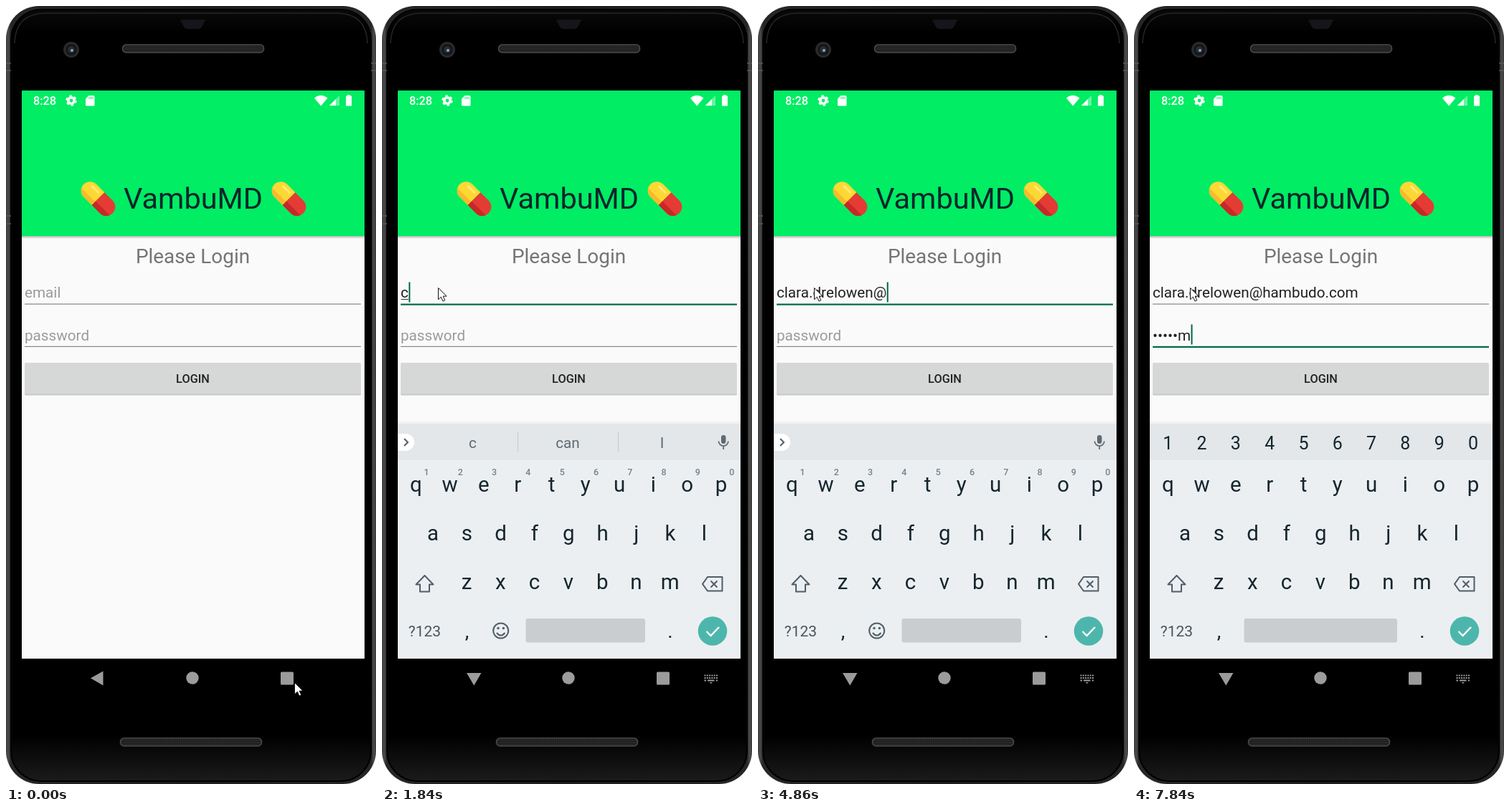
Animation of 516x1086 px, one loop 8 s. Source, as an HTML page:

```html
<!DOCTYPE html>
<html lang="en">
<head>
<meta charset="utf-8">
<title>Login</title>
<style>
  html, body { margin: 0; width: 100%; height: 100%; overflow: hidden; background: #fff; }
  svg { display: block; width: 100vw; height: 100vh; }
  text { font-family: Roboto, "Noto Sans", sans-serif; white-space: pre; }
  .mid { text-anchor: middle; }
  .field { font-size: 20.7px; }
  .line { fill: none; stroke: #4f5f68; stroke-width: 2; }
</style>
</head>
<body>
<svg viewBox="0 0 516 1086" preserveAspectRatio="none" xmlns="http://www.w3.org/2000/svg">
  <defs>
    <linearGradient id="rim" x1="0" x2="1" y1="0" y2="0">
      <stop offset="0" stop-color="#3a3a3a"/>
      <stop offset=".006" stop-color="#4c4c4c"/>
      <stop offset=".013" stop-color="#262626"/>
      <stop offset=".5" stop-color="#1c1c1c"/>
      <stop offset=".987" stop-color="#262626"/>
      <stop offset=".994" stop-color="#4c4c4c"/>
      <stop offset="1" stop-color="#3a3a3a"/>
    </linearGradient>
    <linearGradient id="glass" x1="0" x2="0" y1="0" y2="1">
      <stop offset="0" stop-color="#0a0a0a"/>
      <stop offset=".03" stop-color="#000"/>
      <stop offset=".94" stop-color="#000"/>
      <stop offset="1" stop-color="#1b1b1b"/>
    </linearGradient>
    <linearGradient id="shade" x1="0" x2="0" y1="0" y2="1">
      <stop offset="0" stop-color="#000" stop-opacity=".28"/>
      <stop offset="1" stop-color="#000" stop-opacity="0"/>
    </linearGradient>
    <pattern id="mesh" width="3" height="3" patternUnits="userSpaceOnUse">
      <rect width="3" height="3" fill="#2c2c2c"/>
      <circle cx="1.5" cy="1.5" r=".9" fill="#111"/>
    </pattern>
    <clipPath id="panel"><rect x="22" y="118" width="478" height="809"/></clipPath>
    <g id="pill" transform="rotate(45)">
      <path d="M0-12.5H-16a12.5 12.5 0 0 0 0 25H0z" fill="#fdd835"/>
      <path d="M0-12.5H16a12.5 12.5 0 0 1 0 25H0z" fill="#e53b35"/>
      <path d="M0 5H27.5a12.5 12.5 0 0 1-11.5 7.5H0z" fill="#c62828"/>
      <path d="M0 6H-26.5a12.5 12.5 0 0 0 10.5 6.500H0z" fill="#f9b92c"/>
      <path d="M-18-6.500H-6" stroke="#ffe971" stroke-width="3" stroke-linecap="round"/>
    </g>
    <rect id="slot" width="197" height="11" rx="5" fill="url(#mesh)" stroke="#4b4b4b" stroke-width="1.5"/>
  </defs>

  <!-- phone body -->
  <rect width="516" height="1086" rx="46" fill="url(#rim)"/>
  <rect x="7" y="5" width="502" height="1077" rx="42" fill="url(#glass)" stroke="#000" stroke-width="2"/>
  <path d="M12 52Q13 11 54 10H462Q503 11 504 52" fill="none" stroke="#262626" stroke-width="1.5"/>
  <path d="M0 80H7M0 90H7M0 293H7M0 304H7M509 80H516M509 90H516" stroke="#5a5a5a" stroke-width="1.5"/>
  <path d="M243 19H278L273 29Q271 32 267 32H254Q250 32 248 29Z" fill="#15151b"/>
  <use href="#slot" x="162.5" y="54"/>
  <use href="#slot" x="159.500" y="1022"/>
  <circle cx="91" cy="61" r="11" fill="#2b2b2b"/>
  <circle cx="91" cy="61" r="8" fill="#15171b"/>
  <circle cx="91" cy="61" r="4.500" fill="#27313b"/>
  <circle cx="92" cy="62" r="1.800" fill="#a9bccb"/>

  <!-- app -->
  <rect x="22" y="118" width="478" height="793" fill="#fafafa"/>
  <rect x="22" y="321" width="478" height="4" fill="url(#shade)"/>
  <rect x="22" y="118" width="478" height="203" fill="#00ed64"/>
  <g fill="#fff">
    <text x="38" y="138" font-size="16.300" font-weight="500">8:28</text>
    <circle cx="91" cy="132" r="4.200" fill="none" stroke="#fff" stroke-width="3.600"/>
    <circle cx="91" cy="132" r="6.500" fill="none" stroke="#fff" stroke-width="2.400" stroke-dasharray="3.400 3.407"/>
    <path d="M115.500 125H122q1.500 0 1.500 1.500V138q0 1.500-1.500 1.500H112.500q-1.500 0-1.500-1.500V129.500z"/>
    <path d="M116 127v3M118.500 127v3M121 127v3" stroke="#00ed64"/>
    <path d="M430 128.500Q439 121 448.500 128.500L439.200 139.500z"/>
    <path d="M465 125V139H451z" opacity=".4"/>
    <path d="M460 130V139H451z"/>
    <path d="M476 125.500V124H480V125.500H482V139.500H474V125.500z"/>
  </g>
  <use href="#pill" x="128.500" y="269"/>
  <use href="#pill" x="394.500" y="269"/>
  <text class="mid" x="261" y="283" font-size="41.500" fill="#08262c">VambuMD</text>
  <text class="mid" x="260.500" y="359" font-size="27.900" fill="#757575">Please Login</text>
  <text id="mail" class="field" x="26" y="407"/>
  <path id="compose" stroke="#333"/>
  <rect id="mailLine" x="26" y="415.500" width="469"/>
  <text id="pass" class="field" x="26" y="466.500"/>
  <rect id="passLine" x="26" y="474.800" width="469"/>
  <rect id="caret" width="2" height="28" fill="#00684a"/>
  <rect x="26" y="500" width="469" height="43.500" rx="2" fill="#000" opacity=".2"/>
  <rect x="26" y="498" width="469" height="43.500" rx="2" fill="#d6d7d7"/>
  <text class="mid" x="260.500" y="525.800" font-size="16.300" font-weight="500" fill="#212121">LOGIN</text>

  <!-- navigation bar -->
  <g fill="#9b9b9b">
    <path id="back"/>
    <circle cx="260" cy="938" r="8.700"/>
    <rect x="383" y="929.500" width="18" height="18" rx="1.500"/>
    <g id="kbIcon">
      <path d="M449.500 934.500H468M449.500 938H468" stroke="#9b9b9b" stroke-width="2" stroke-dasharray="2 1.300"/>
      <path d="M449.500 941.500H452M454 941.500H463.500M466 941.500H468" stroke="#9b9b9b" stroke-width="2"/>
      <path d="M456.500 944H461L458.700 946z"/>
    </g>
  </g>

  <!-- keyboard -->
  <g clip-path="url(#panel)"><g id="board">
    <rect x="22" y="580" width="478" height="3" fill="#000" opacity=".03"/>
    <rect x="22" y="583" width="478" height="328" fill="#eceff1"/>
    <rect x="22" y="583" width="478" height="51" fill="#e3e7ea"/>
    <g id="strip">
      <path d="M22 597H33a12 12 0 0 1 0 24H22z" fill="#fff"/>
      <path class="line" d="M31 604L36 609L31 614"/>
      <g id="words" fill="#5f6b72">
        <path d="M189.500 595V622M329.500 595V622" stroke="#c3c9cd"/>
      </g>
      <g fill="#5f6b72">
        <rect x="473" y="599" width="6.500" height="12" rx="3.200"/>
        <path d="M469.500 607.500a6.700 6.700 0 0 0 13.400 0M476.200 614V619" fill="none" stroke="#5f6b72" stroke-width="1.800"/>
      </g>
    </g>
    <g id="keys" fill="#14262e"></g>
    <path class="line" d="M59.500 795L71.500 807.500H66V817.500H53V807.500H47.500z" stroke-linejoin="round"/>
    <path class="line" d="M454 797H474.500V816.500H454L447 806.800z M458.500 802.500L467.500 811.500M467.500 802.500L458.500 811.500" stroke-linejoin="round"/>
    <text class="mid" x="59.500" y="879.500" font-size="21" fill="#45555e">?123</text>
    <g id="smile">
      <circle class="line" cx="165.700" cy="872" r="10.500"/>
      <path class="line" d="M160 875Q165.700 882 171.400 875"/>
      <circle cx="162" cy="868.500" r="1.700" fill="#4f5f68"/>
      <circle cx="169.400" cy="868.500" r="1.700" fill="#4f5f68"/>
    </g>
    <rect id="space" y="855" height="33.500" rx="3" fill="#c9cdd0"/>
    <circle cx="461" cy="872.500" r="20.300" fill="#4db6ac"/>
    <path d="M452.500 873L458.500 879L470 867" fill="none" stroke="#fff" stroke-width="2.400"/>
  </g></g>

  <path id="mouse" d="M0 0V16.200L3.900 12.700L6.500 18.500L9.300 17.300L6.700 11.600H11.600z" fill="#fff" stroke="#111"/>
</svg>
<script>
const LOOP = 8000;
const MAIL = "clara.drelowen@hambudo.com";
const PASS = "tolnem";
// moment of each key press
const mailTimes = [1840, 1960, 2090, 2220, 2350, 2480, 2610, 2740, 2910,
  3770, 3910, 4040, 4180, 4310, 4860, 5010, 5130, 5240, 5360, 5470, 5590, 5700, 5820,
  5970, 6050, 6130];
const passTimes = [6660, 6860, 7060, 7370, 7610, 7840];
const hints = ["thanks I we", "c can I", "cl close class", "cla class claim",
  "clar clarify clarity", "clara clarity clarinet"];
const CLICK = 1090, OPEN = 1170, NEXT = 6430;

const $ = id => document.getElementById(id);
const set = (el, attrs) => { for (const k in attrs) el.setAttribute(k, attrs[k]); };
const show = (el, on) => set(el, { display: on ? "inline" : "none" });
const count = (times, t) => times.filter(x => x <= t).length;

function label(parent, str, x, y, size, extra) {
  const el = document.createElementNS("http://www.w3.org/2000/svg", "text");
  el.textContent = str;
  set(el, { x, y, "font-size": size, class: "mid", ...extra });
  parent.appendChild(el);
  return el;
}

function row(str, x, y, size, extra) {
  return [...str].map((c, i) => label($("keys"), c, x + i * 47.3, y, size, extra));
}

row("qwertyuiop", 47.3, 677.5, 29.5);
row("asdfghjkl", 71, 745.7, 29.5);
row("zxcvbnm", 118, 814, 29.5);
label($("keys"), ",", 118.5, 881.5, 28);
label($("keys"), ".", 402, 881.5, 28);
const small = row("1234567890", 62, 655, 12.5, { fill: "#76828a", "font-weight": 500 });
const digits = row("1234567890", 47.3, 619, 25);
const words = [126.5, 259, 390.5].map(x => label($("words"), "", x, 616.5, 20.7));

function input(id, text, hint) {
  $(id).textContent = text || hint;
  set($(id), { fill: text ? "#212121" : "#9b9b9b" });
  return text ? $(id).getComputedTextLength() : 0;
}

function underline(id, on) {
  set($(id), { height: on ? 2.2 : 1.1, fill: on ? "#00684a" : "#7d7d7d" });
}

function moveMouse(t) {
  const step = t < 70 ? 0 : Math.min(8, Math.floor((t - 70) / 127.5) + 1);
  const p = step / 8, e = p * p * (3 - 2 * p);
  const over = step === 7 ? -32 : step === 6 ? -20 : 0;
  set($("mouse"), { transform: `translate(${402.5 - 324 * e} ${944.5 - 551 * e + over})` });
}

function draw(t) {
  const n = count(mailTimes, t), m = count(passTimes, t);
  const open = t >= OPEN, second = t >= NEXT;

  const mailWidth = input("mail", MAIL.slice(0, n), "email");
  const shown = m ? "•".repeat(m - 1) + PASS[m - 1] : "";
  const passWidth = input("pass", shown, "password");
  underline("mailLine", t >= CLICK && !second);
  underline("passLine", second);
  set($("compose"), { d: n && n < 6 ? `M26.5 409.5H${26 + mailWidth}` : "" });

  const caretX = 26.5 + (second ? passWidth : mailWidth);
  set($("caret"), { x: caretX, y: second ? 444.5 : 385.5 });
  show($("caret"), open && !(t >= 3360 && t < 3770));

  // keyboard rises the last few pixels while fading in
  const k = count([1170, 1230, 1300, 1380], t);
  show($("board"), open);
  set($("board"), {
    transform: `translate(0 ${[0, 16, 8, 3, 0][k]})`,
    opacity: [0, 0.8, 0.9, 0.97, 1][k]
  });
  show($("strip"), !second);
  show($("smile"), !second);
  small.forEach(el => show(el, !second));
  digits.forEach(el => show(el, second));
  show($("words"), n < 6);
  (hints[n] || "  ").split(" ").forEach((w, i) => { words[i].textContent = w; });
  const left = second ? 153.5 : 200.5;
  set($("space"), { x: left, width: 367 - left });

  set($("back"), { d: open ? "M118 931H138.500L128.300 948.500z" : "M118 938.300L135.500 928.500V948.500z" });
  show($("kbIcon"), open);
  moveMouse(t);
}

function tick(now) {
  draw(now % LOOP);
  requestAnimationFrame(tick);
}
draw(0);
requestAnimationFrame(tick);
</script>
</body>
</html>
```
